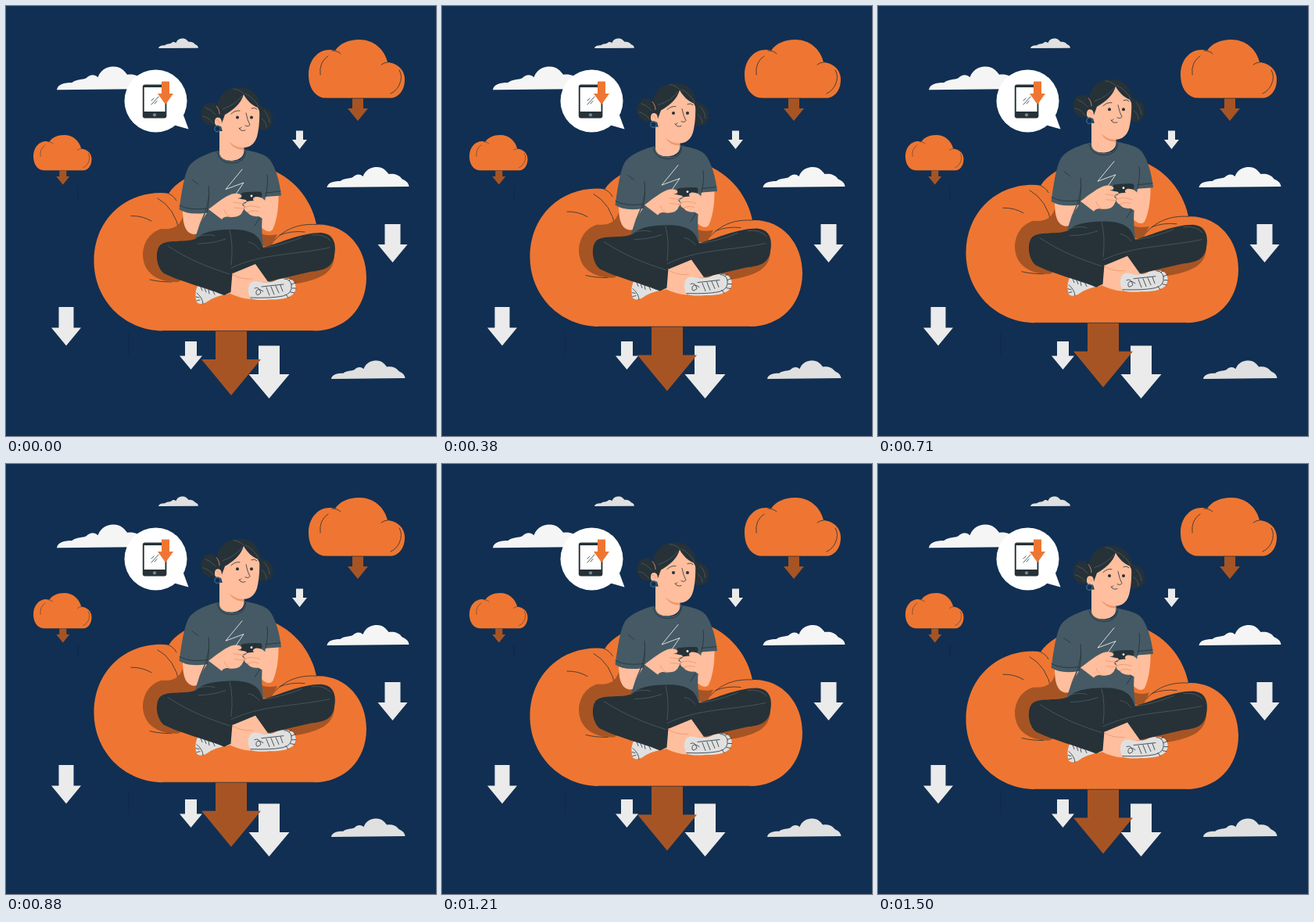
Write an HTML page that moves like this. It is 550 by 550 pixels and loops after 1540 ms.

```html
<!DOCTYPE html>
<html lang="en">
<head>
<meta charset="utf-8">
<title>Cloud download</title>
<style>
  html, body { margin: 0; height: 100%; overflow: hidden; background: #112f52; }
  svg { display: block; width: 100vw; height: 100vh; }
  .white { fill: #f5f5f5; }
  .grey { fill: #e0e0e0; }
  .pale { fill: #ebebeb; }
  .orange { fill: #ee7632; }
  .brown { fill: #a75424; }
  .dark { fill: #263238; }
  .shirt { fill: #455a64; }
  .skin { fill: #ffbe9d; }
  .line { fill: none; stroke: #263238; stroke-width: .8; stroke-linecap: round; stroke-linejoin: round; }
  .seam { stroke: #52626a; stroke-width: .7; }
  .fold { stroke: #eb996e; }
</style>
</head>
<body>
<svg viewBox="0 0 550 550">
  <defs>
    <path id="wisp" d="M0 26C1 20 8 18 17 18C22 14 29 15 33 13C37 9 42 8 46 12C50 2 58 0 64 0C72 0 76 5 79 9C86 8 92 10 95 14C97 17 104 17 105 25Z"/>
    <g id="puff">
      <path class="orange" d="M24 75C9 75 0 62 0 45C0 26 12 13 27 13Q31 13 34 14C40 5 51 0 65 0C83 0 97 12 101 29C113 30 123 38 123 51C123 65 115 75 103 75Z"/>
      <path class="line" d="M15 45Q13 29 25 21M30 14Q37 14 41 18M101 29Q97 29 93 32M116 39Q121 47 116 58Q112 66 105 69M20 75H106"/>
    </g>
  </defs>

  <path class="line" stroke-width=".6" style="stroke:#0e2849" d="M92 232V247M157 418V447"/>
  <use href="#wisp" class="white" transform="translate(65 77.5) scale(1.14)"/>
  <use href="#wisp" class="white" transform="translate(410.5 206)"/>
  <use href="#wisp" class="grey" transform="translate(195 41.5) scale(.485)"/>
  <use href="#wisp" class="grey" transform="translate(416 453.5) scale(.9)"/>
  <g id="still"></g>
  <use href="#puff" transform="translate(387 43)"/>
  <use href="#puff" transform="translate(35 165) scale(.606)"/>

  <g id="bubble">
    <path fill="#fff" d="M214 152L233.5 157.5L226 137Z"/>
    <circle cx="191.5" cy="121.5" r="40" fill="#fff"/>
    <rect class="dark" x="174.8" y="100.5" width="30.6" height="43" rx="3"/>
    <path fill="#fff" d="M176.7 104H203.5V135H176.7Z"/>
    <circle cx="190" cy="139.3" r="2.1" fill="#78868c"/>
    <path class="line" d="M186 126L195 116M190 125L193 121.500M186 121L189 118"/>
  </g>

  <g id="floater">
    <g id="drop"></g>
    <path class="orange" d="M202 415.500C150 415.500 112.500 375 112.500 326C112.500 276 149 239 198 239Q204 239 208 240C222 218 262 203 306 203C350 203 388 235 397 279.500C435 278 461 309 461 347C461 388 432 415.500 394 415.500Z"/>
    <path class="line" d="M200 415.600H394M160 268.500Q174 268 186 275M194 246Q216 258 222 289M208 240Q214 242 218 249M342 301C355 287 371 278 397 279.500M350 293Q365 287 382 289M184 350Q196 353 212 353"/>
    <path class="brown" d="M227 266C223 283 213 286 199 285C184 289 175 303 175 319C176 342 195 354 220 353L260 330L246 270ZM320 270L326 291Q335 295 347 292L339 308L322 307ZM330 352C350 358 374 357 396 349C412 343 420 334 420 318L390 320Z"/>

    <g id="feet">
      <path class="grey" d="M246 356Q240 367 244 379Q248 383 256 379Q266 371 286 368L272 358Z"/>
      <path class="line" d="M244 367Q252 374 252 381M249 359L251 364M254 361L256 366M259 363L260 368M243 372L247 373M244 377L248 376M264 363L267 369"/>
      <path class="skin" d="M282 344L320 327L337 353L313 354Q311 365 313 375Q299 374 285 367Z"/>
      <path class="line fold" d="M289 343Q300 350 315 349"/>
    </g>

    <path class="skin" d="M273 160H304.500V184Q305 196 289 198Q273 198 273 188Z"/>
    <path d="M285 173Q294 182 304 181V184Q291 184 285 173Z" fill="#eb996e"/>
    <path class="skin" d="M226 260C226 276 228 290 240 292C252 292 268 279 283 270L280 248L256 258ZM330 241L348.500 241C349 258 346 276 341 286C335 293 323 283 317 269Z"/>
    <path class="shirt" d="M272 185C258 188 241 195 234 205C228 215 225 236 221.500 260Q233 268 257 264.500L248 278L239 306L329 307Q326 286 328 268L332 244L352 242.500C350 223 344 205 337 196C330 188 314 186 305 183.500C306 195 299 199 289 198C280 198 273 195 272 185Z"/>
    <path fill="#37474f" d="M260 231Q259 248 254 264L248 278Q260 263 260 231Z"/>
    <path class="line" d="M270 187Q273 201 289 201Q306 201 307 185M222 255Q235 262 257 259M332 239L351 237M259 230Q261 248 257 264M332 244Q336 226 334 216M238 222L246 228M326 269L318 281"/>
    <path class="line" style="stroke:#fff" d="M302 209L281 234.500L304 226L293 242"/>

    <path class="dark" d="M301 239Q308 237 325 237.500Q328 238 327.500 242L325 250Q312 253 300 249Z"/>
    <circle cx="314" cy="243" r="1.4" fill="#fff"/>
    <path class="skin" d="M259 260C271 251 282 242 291 240Q298 239 301 242Q303 245 296 246L307 248Q310 252 303 253Q307 257 303 262Q300 271 287 270Q279 268 276 273ZM333 251Q328 243 319 244Q314 246 317 249Q309 249 303 252Q301 256 306 257Q303 261 309 264Q313 270 323 269L335 276Z"/>
    <path class="line fold" d="M291 251L304 253M292 258L304 259M306 257Q314 254 325 258M309 264Q316 260 323 263M279 261Q282 268 287 270"/>

    <path class="dark" d="M239 304Q246 287 281 286Q321 283 327 305L329 309C351 303 377 290 403 290C419 291 423 304 420 319C418 334 408 338 389 340L335 352.500L319 330L290 342L285 310Z"/>
    <path class="dark" d="M242 298C227 303 206 298 197 306C190 314 192 334 202 342C222 352 254 360 279 370L287.500 366L289.500 341.500L318 330L302 292Z"/>
    <path class="line seam" d="M286 287Q291 306 288 331M246 304Q264 304 281 298M207 307C235 325 258 334 286 343M288 335C329 316 366 319 414 309M310 302Q318 303 324 311M331 309Q353 306 378 296M244 295Q259 291 267 294M391 293Q407 291 415 300"/>

    <path class="grey" d="M312 355Q316 350 325 353Q338 355 347 350Q359 346 367 351Q374 359 368 368Q360 376 337 375.500Q320 377 313 374Q307 365 312 355Z"/>
    <path class="line" d="M313 373Q339 374 354 371Q367 368 365 356Q363 349 356 349M362 351L365 348.500M365 356L370.500 354M366 361L371 361M364 366L369 367M358 369L361 373M318 361Q324 358 326 367Q319 373 320 365Q322 360 329 365M333 360L337 370M339 359L343 369M345 358L349 367M351 357L354 365M327 359L355 356"/>

    <g id="head">
      <path class="dark" d="M266 124Q254 122 250.500 132Q247 145 256 151Q267 156 276 148ZM322 128Q334 128 340 138Q344 151 335 157Q327 161 319 155Z"/>
      <path class="skin" d="M276 132L304 110Q320 116 324 130Q325 148 322 163Q319 179 306 181Q290 180 279 168L275 154Q266 155 267 147Q268 140 276 144Z"/>
      <path class="dark" d="M268 143C267 118 279 104 298 104C314 103 326 115 327 138Q324 135 322 130C315 127 308 121 304 113C301 125 289 134 280 139L276 150Q276 142 270 142Z"/>
      <path class="line seam" d="M304 112Q299 107 291 106M302 115Q294 126 277 132M306 112Q318 118 323 129M255 130Q262 132 268 139M252 141Q260 143 265 150M330 134Q336 139 337 149M327 144Q333 148 333 155"/>
      <path class="line fold" d="M269 128Q273 132 273 138M269 146Q273 145 273 150"/>
      <circle class="line" style="stroke:#37617c;stroke-width:1.5" cx="270.500" cy="157" r="3.700"/>
      <g class="dark"><circle cx="296" cy="142.500" r="2"/><circle cx="314" cy="142.500" r="2"/></g>
      <path class="line" stroke-width="1.300" d="M288 138Q293 133 299 134M314 131Q318 129 321 132M307 137Q309 147 312 152Q310 155 306 153M298 156Q300 161 306 159M299 157L301 155"/>
    </g>
  </g>
</svg>
<script>
const SVG = "http://www.w3.org/2000/svg";
const $ = id => document.getElementById(id);

// Down arrow: centre, top, shaft width, shoulder height, head width, tip.
function arrow(parent, fill, x, top, shaft, neck, head, tip) {
  const path = document.createElementNS(SVG, "path");
  const s = shaft / 2, h = head / 2;
  path.setAttribute("class", fill);
  path.setAttribute("d", `M${x - s} ${top}H${x + s}V${neck}H${x + h}L${x} ${tip}L${x - h} ${neck}H${x - s}Z`);
  $(parent).append(path);
}
arrow("still", "pale", 375.500, 159.500, 9, 171, 19, 183);
arrow("still", "pale", 494.500, 279, 20, 305, 38, 328);
arrow("still", "pale", 77, 385, 19, 411.500, 38, 434.500);
arrow("still", "pale", 236.500, 429, 15, 447.500, 29, 465);
arrow("still", "pale", 336.500, 434.500, 27, 471, 52, 502);
arrow("still", "brown", 450, 117, 14, 131, 26, 147);
arrow("still", "brown", 72.800, 209, 9, 218, 17, 228.500);
arrow("drop", "brown", 288, 414, 40, 452, 76, 498);
arrow("bubble", "orange", 204, 96.500, 10, 112, 20, 126);

const LOOP = 1540, STEP = LOOP / 37, TURN = 724, SPEED = 0.0145;

// Steady drift up to TURN and back, sampled at 24 steps per second.
function draw(now) {
  const time = Math.floor((now % LOOP) / STEP) * STEP;
  const gap = Math.abs(time - TURN);
  const y = SPEED * Math.min(gap, LOOP - gap) - 10.5;
  $("floater").setAttribute("transform", `translate(0 ${y.toFixed(2)})`);
}
const start = performance.now();
function tick() {
  draw(performance.now() - start);
  requestAnimationFrame(tick);
}
tick();
</script>
</body>
</html>
```
